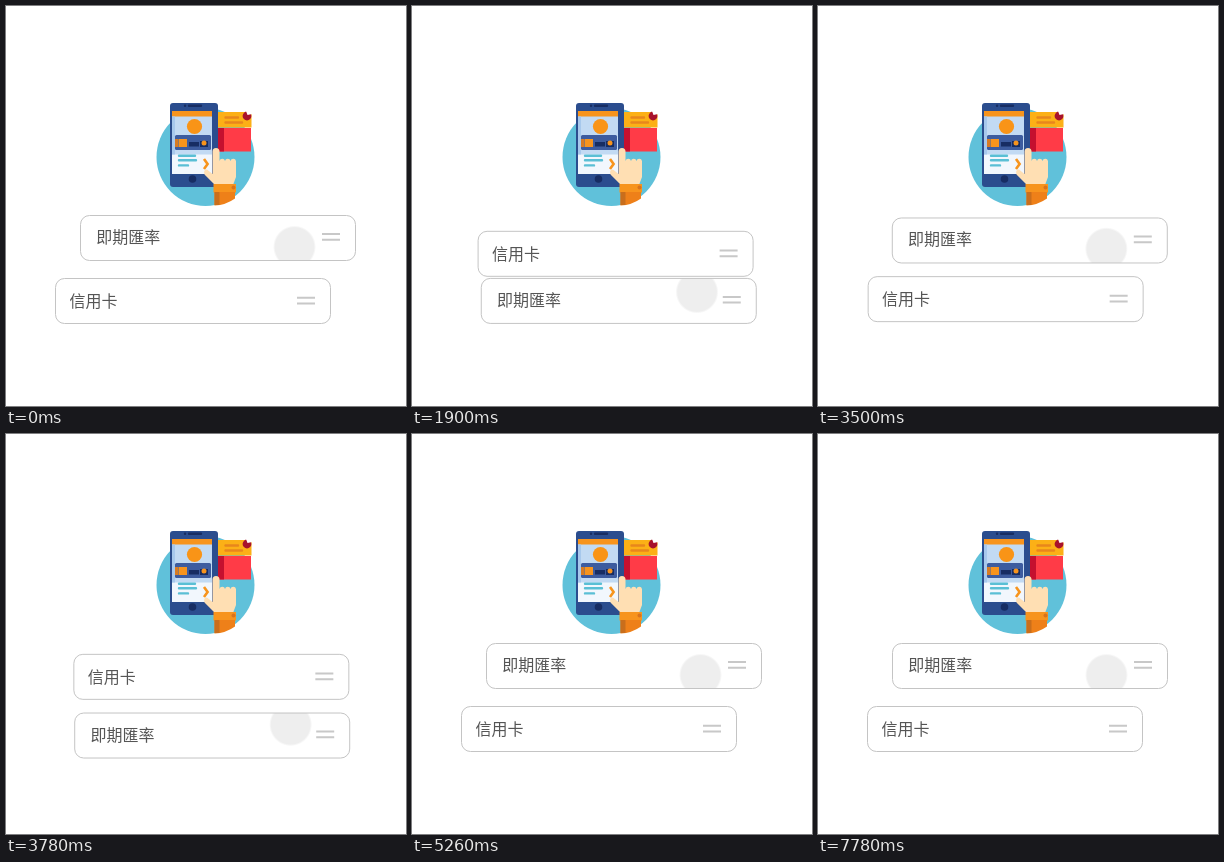
Recreate the animation shown at these times as an HTML page. Size 400x400 px, loop 8000 ms.

```html
<!DOCTYPE html>
<html lang="zh-Hant">
<head>
<meta charset="utf-8">
<title>Reorder cards</title>
<style>
  html, body { margin: 0; width: 100%; height: 100%; overflow: hidden; background: #fff; }
  svg { display: block; width: 100vw; height: 100vh; }
  text { font: 16px "Noto Sans CJK TC", "Noto Sans CJK", "Noto Sans", sans-serif; fill: #555; }
  .face { fill: #fff; }
  .edge { fill: none; stroke: #c4c4c4; }
  .grip { stroke: #c8c8c8; stroke-width: 2; }
</style>
</head>
<body>
<svg viewBox="0 0 400 400">
  <defs>
    <rect id="box" x=".5" y=".5" width="275" height="45" rx="9"/>
    <path id="grip" d="M242 0h18M242 5.7h18"/>
    <clipPath id="inside"><use href="#box"/></clipPath>
    <radialGradient id="soft">
      <stop offset=".9" stop-color="#eee"/>
      <stop offset="1" stop-color="#eee" stop-opacity="0"/>
    </radialGradient>
  </defs>

  <g id="picture">
    <circle cx="199.5" cy="151" r="49" fill="#60c1da"/>

    <!-- payment cards -->
    <path fill="#fcb016" d="M212 106h33.5v15.500h-33.500z"/>
    <path stroke="#e8861c" stroke-width="2.400" stroke-linecap="round" d="M219.500 111.500h12.500M219.500 116.500h16.500"/>
    <circle cx="241" cy="110" r="4.400" fill="#a8122c"/>
    <path fill="#fff" d="M240 105l1.500 4 4.500-1v-4z"/>
    <path fill="#ff3b47" d="M212 122h33v23.500h-33z"/>
    <path fill="#c5102f" d="M212 122h6v23.500h-6z"/>

    <!-- phone -->
    <rect x="164" y="97" width="48" height="84" rx="3" fill="#2b4d8e"/>
    <path stroke="#172d63" stroke-width="2.400" stroke-linecap="round" d="M179 99.700h.1M183 99.700h12"/>
    <path fill="#c2daf3" d="M166 105h40v63h-40z"/>
    <path fill="#f2f7fd" d="M166 148.500h40v19.500h-40z"/>
    <path fill="#f7941d" d="M166 105h40v5.500h-40z"/>
    <path fill="#a7c8ec" d="M166 110.500h3v38h-3z"/>
    <circle cx="188.500" cy="120.500" r="7.600" fill="#f99417"/>
    <rect x="169" y="129" width="36" height="15" rx="1.500" fill="#3d5c9f"/>
    <path fill="#f7941d" d="M172.500 133h8.500v8h-8.500z"/>
    <path fill="#d87b22" d="M169 133h3v8h-3z"/>
    <path fill="#172d63" d="M183 136h10v4.500h-10zM194 135h8v6h-8z"/>
    <circle cx="198" cy="137" r="2.500" fill="#f7941d"/>
    <path stroke="#5abfd5" stroke-width="2.400" stroke-linecap="round" d="M173 149.800h16M173 154.200h17M173 159.400h9"/>
    <circle cx="186.500" cy="173" r="3.800" fill="#172d63"/>
    <path fill="none" stroke="#f7941d" stroke-width="2.600" d="M198 153l3.600 5-3.600 5"/>

    <!-- hand -->
    <path fill="#ffdfb3" d="M206.500 145.500a3.500 3.500 0 0 1 7 0V155a2.800 2.800 0 0 1 5.500 0a2.800 2.800 0 0 1 5.500 0a2.800 2.800 0 0 1 5.500 0V171L227 179H209L198.500 168.500Q197 163.500 201 163.500L206.500 168z"/>
    <path fill="#f7941d" d="M207.500 178h22.500v8.500h-22.500z"/>
    <path fill="#ee8019" d="M208.500 186h20.500v6.500q-9 6.500-20.500 7z"/>
    <path fill="#c96e1c" d="M208.500 186h5v13h-5z"/>
    <circle cx="227.500" cy="181.500" r="2" fill="#d9731c"/>
  </g>

  <g id="credit">
    <use href="#box" class="face"/>
    <use href="#box" class="edge"/>
    <text x="14.400" y="29">信用卡</text>
    <use href="#grip" class="grip" y="19.700"/>
  </g>

  <g id="rate">
    <use href="#box" class="face"/>
    <g clip-path="url(#inside)"><circle id="touch" r="21.500" fill="url(#soft)"/></g>
    <use href="#box" class="edge"/>
    <text x="16.200" y="28">即期匯率</text>
    <use href="#grip" class="grip" y="19"/>
  </g>
</svg>
<script>
  const LOOP = 8000, STEP = 40, COUNT = 9;
  const swaps = [500, 1860, 3500, 4940, 6180, 7460];
  const parts = [
    { id: 'rate', from: [74, 209], to: [68, 281] },
    { id: 'credit', from: [49, 272], to: [68, 218] },
    { id: 'touch', from: [214.5, 32], to: [216.5, 11.5] }
  ].map(part => ({ ...part, el: document.getElementById(part.id) }));

  const ease = p => p * p * (3 - 2 * p);

  // 0 = rate card on top, 1 = credit card on top
  function progress(time) {
    const past = swaps.filter(start => start <= time);
    if (!past.length) return 0;
    const step = Math.floor((time - past[past.length - 1]) / STEP) + 1;
    const p = ease(Math.min(step / COUNT, 1));
    return past.length % 2 ? p : 1 - p;
  }

  function draw(time) {
    const p = progress(time % LOOP);
    for (const { el, from, to } of parts) {
      const [x, y] = from.map((v, i) => v + (to[i] - v) * p);
      el.setAttribute('transform', `translate(${x} ${y})`);
    }
  }

  const origin = performance.now();
  function tick() {
    draw(performance.now() - origin);
    requestAnimationFrame(tick);
  }
  tick();
</script>
</body>
</html>
```
